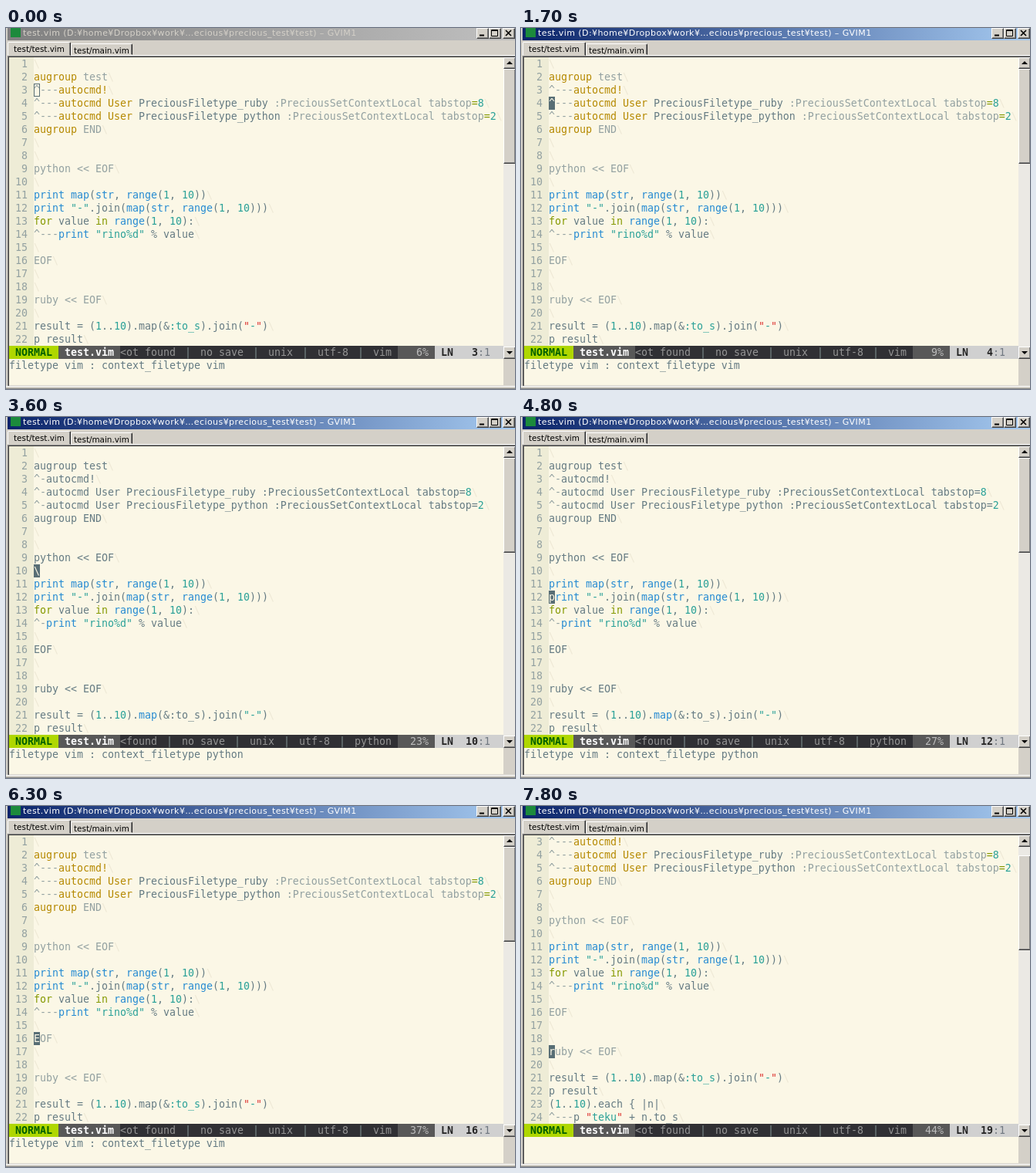
An HTML page that plays this animation: 660 px wide and 468 px high, repeating every 8000 ms.

```html
<!DOCTYPE html>
<html lang="en">
<head>
<meta charset="utf-8">
<title>Editor session</title>
<style>
html, body { margin: 0; width: 660px; height: 468px; overflow: hidden; }
#win {
  --y: #b58900; --g: #93a1a1; --o: #859900; --m: #657b83; --s: #2aa198; --q: #dc322f;
  position: relative; width: 660px; height: 468px; overflow: hidden; background: #d4d0c8;
}
#win.py { --y: #657b83; --g: #657b83; --o: #657b83; --m: #268bd2; --s: #657b83; --q: #2aa198; }
#win div, #win svg { position: absolute; box-sizing: border-box; }

#title {
  left: 2px; top: 0; width: 658px; height: 16px; padding-left: 20px;
  background: linear-gradient(90deg, #0a246a, #a6caf0); color: #fff;
  font: 11px/14px "DejaVu Sans", sans-serif; letter-spacing: .43px; white-space: pre;
}
.idle #title { background: linear-gradient(90deg, #808080, #c0c0c0); color: #d4d0c8; }
#icon { left: 6px; top: 0; width: 13px; height: 12px; background: #1c8a3c; }
.raised {
  background: #d4d0c8; border: 1px solid; border-color: #fff #404040 #404040 #fff;
  box-shadow: inset -1px -1px #808080;
}
.tab {
  border: 1px solid; border-color: #fff #202020 transparent #fff; border-radius: 2px 2px 0 0;
  box-shadow: inset -1px 0 #808080; color: #000;
  font: 10.4px/16px "DejaVu Sans", sans-serif; white-space: pre;
}
#ledge { left: 2px; top: 35px; width: 658px; height: 1px; background: #fff; }
#edge { left: 2px; top: 36px; width: 658px; height: 428px; border: solid #808080; border-width: 1px 0 0 1px; }
#edge2 { left: 3px; top: 37px; width: 657px; height: 427px; border: solid #404040; border-width: 1px 0 0 1px; }
#base { left: 0; top: 464px; width: 660px; height: 4px; border-top: 1px solid #fff; border-bottom: 1px solid #808080; }

#text { left: 4px; top: 38px; width: 641px; height: 425px; background: #fbf7e6; overflow: hidden; }
#text, #text div { font: 13.29px/17px "DejaVu Sans Mono", monospace; white-space: pre; color: #657b83; }
#gutter { left: 0; top: 0; width: 32px; height: 374px; background: #eeecd6; }
#rows { left: 0; top: 0; }
#text .n, #text .t { color: #93a1a1; }
.y { color: var(--y); } .g { color: var(--g); } .o { color: var(--o); }
.m { color: var(--m); } .s { color: var(--s); } .q { color: var(--q); }
.c { color: #2aa198; } .b { color: #268bd2; } .k { color: #859900; }
.e { color: #eee8d5; }
#text #cursor { left: 32px; width: 8px; height: 17px; background: #586e75; color: #fbf7e6; }
#text #cursor.box { background: none; color: transparent; border: 1px solid #586e75; }
#text #cursor.off { display: none; }

#status { left: 0; top: 374px; width: 641px; height: 17px; }
#status div { height: 17px; top: 0; }
#status .mode { left: 0; width: 64px; background: #afd700; color: #005f00; font-weight: bold; }
#status .file { left: 64px; width: 80px; background: #585858; color: #fff; font-weight: bold; }
#status .info { left: 144px; width: 360px; background: #303034; color: #949494; }
#status .pct { left: 504px; width: 48px; background: #585858; color: #bcbcbc; }
#status .pos { left: 552px; width: 89px; background: #d0d0d0; color: #707880; }
#status b { color: #262626; }
#status i { display: inline-block; width: 16px; text-align: center; font-style: normal; color: #7c8c8c; }
#msg { left: 0; top: 391px; }

#track { left: 645px; top: 38px; width: 16px; height: 391px; background: #ebe9e4; }
#track div { left: 0; width: 16px; }
</style>
</head>
<body>
<div id="win">
  <div id="title">test.vim (D:¥home¥Dropbox¥work¥…ecious¥precious_test¥test) – GVIM1</div>
  <div id="icon"></div>
  <div class="raised" style="left:610px;top:0;width:16px;height:14px"></div>
  <div class="raised" style="left:626px;top:0;width:16px;height:14px"></div>
  <div class="raised" style="left:644px;top:0;width:16px;height:14px"></div>
  <svg width="660" height="16" fill="none" stroke="#000">
    <path d="M614 9.5h6" stroke-width="2"/>
    <path d="M629.5 2.5h8v8h-8zM629 3.5h9"/>
    <path d="M648 3l7 7M655 3l-7 7" stroke-width="1.6"/>
  </svg>

  <div id="ledge"></div>
  <div id="edge"></div>
  <div id="edge2"></div>
  <div id="base"></div>
  <div class="tab" style="left:2px;top:18px;width:82px;height:18px;padding-left:7px;background:#d4d0c8">test/test.vim</div>
  <div class="tab" style="left:84px;top:20px;width:80px;height:15px;padding-left:3px">test/main.vim</div>

  <div id="text">
    <div id="gutter"></div>
    <div id="rows"></div>
    <div id="cursor"></div>
    <div id="status">
      <div class="mode"> NORMAL </div>
      <div class="file"> test.vim </div>
      <div class="info" id="info"></div>
      <div class="pct" id="pct"></div>
      <div class="pos" id="pos"></div>
    </div>
    <div id="msg"></div>
  </div>

  <div id="track">
    <div class="raised" style="top:0;height:15px"></div>
    <div class="raised" id="thumb" style="height:123px"></div>
    <div class="raised" style="top:375px;height:16px"></div>
    <svg width="16" height="391"><path d="M4 9h8l-4 -4zM4 381h8l-4 4z"/></svg>
  </div>
</div>

<script>
// "~x" switches to colour class x; "\t" is a visible tab.
const LINES = [
  "",
  "~yaugroup ~gtest",
  "\t~yautocmd!",
  "\t~yautocmd User ~dPreciousFiletype_ruby ~g:PreciousSetContextLocal tabstop~o=~c8",
  "\t~yautocmd User ~dPreciousFiletype_python ~g:PreciousSetContextLocal tabstop~o=~c2",
  "~yaugroup ~gEND",
  "",
  "",
  "~gpython << EOF",
  "",
  "~bprint map~d(~bstr~d, ~brange~d(~c1~d, ~c10~d))",
  "~bprint ~c\"-\"~d.join(~bmap~d(~bstr~d, ~brange~d(~c1~d, ~c10~d)))",
  "~kfor ~dvalue ~kin ~brange~d(~c1~d, ~c10~d):",
  "\t~bprint ~c\"rino%d\"~d % value",
  "",
  "~gEOF",
  "",
  "",
  "~gruby << EOF",
  "",
  "result = (~c1~d..~c10~d).~mmap~d(&~s:to_s~d).join(~q\"~c-~q\"~d)",
  "p result",
  "(~c1~d..~c10~d).each { |n|",
  "\tp ~q\"~cteku~q\"~d + n.to_s"
];
const TOTAL = 43, ROWS = 22, LOOP = 8000;

// [start ms, cursor line, cursor look]
const STEPS = [
  [0, 3, "box"], [300, 3], [1000, 3, "off"], [1300, 3], [1700, 4], [2000, 5],
  [2200, 6], [2400, 7], [2600, 8], [2800, 9], [3500, 10], [3600, 10],
  [4300, 10, "off"], [4500, 11], [4800, 12], [5100, 13], [5400, 14], [5600, 15],
  [6200, 16], [6300, 16], [7000, 16, "off"], [7100, 17], [7400, 18], [7800, 19]
];

const el = id => document.getElementById(id);
const esc = s => s.replace(/&/g, "&amp;").replace(/</g, "&lt;");
const span = (cls, s) => `<span class="${cls}">${esc(s)}</span>`;

function row(n, tab) {
  const code = ("~d" + LINES[n - 1]).replace("\t", `~t${tab}~d`);
  const parts = code.split("~").slice(1).map(p => span(p[0], p.slice(1)));
  return span("n", String(n).padStart(3) + " ") + parts.join("") + span("e", "\\");
}

function firstChar(n) {
  return LINES[n - 1].replace(/~./g, "").replace("\t", "^")[0] || "\\";
}

function show([start, line, look = ""]) {
  const python = start >= 3600 && start < 6300;
  const type = python ? "python" : "vim";
  const top = Math.max(1, line - 16);
  el("win").className = (python ? "py" : "") + (start < 300 ? " idle" : "");

  const rows = [];
  for (let n = top; n < top + ROWS && n <= LINES.length; n++) rows.push(row(n, python ? "^-" : "^---"));
  el("rows").innerHTML = rows.join("\n");

  const cursor = el("cursor");
  cursor.className = look;
  cursor.textContent = firstChar(line);
  cursor.style.top = (line - top) * 17 + "px";

  const info = [python ? "<found" : "<ot found", "no save", "unix", "utf-8", type];
  el("info").innerHTML = info.map(esc).join(" <i>|</i> ");
  el("pct").textContent = String(Math.floor(100 * line / TOTAL)).padStart(4) + "%";
  el("pos").innerHTML = ` <b>LN ${String(line).padStart(3)}</b>:1`;
  el("msg").textContent = top > 1 ? "" : `filetype vim : context_filetype ${type}`;
  el("thumb").style.top = 15 + Math.round(5.6 * (top - 1)) + "px";
}

let shown;
function tick() {
  const t = performance.now() % LOOP;
  const step = STEPS.filter(s => s[0] <= t).pop();
  if (step !== shown) show(shown = step);
  requestAnimationFrame(tick);
}
tick();
</script>
</body>
</html>
```
